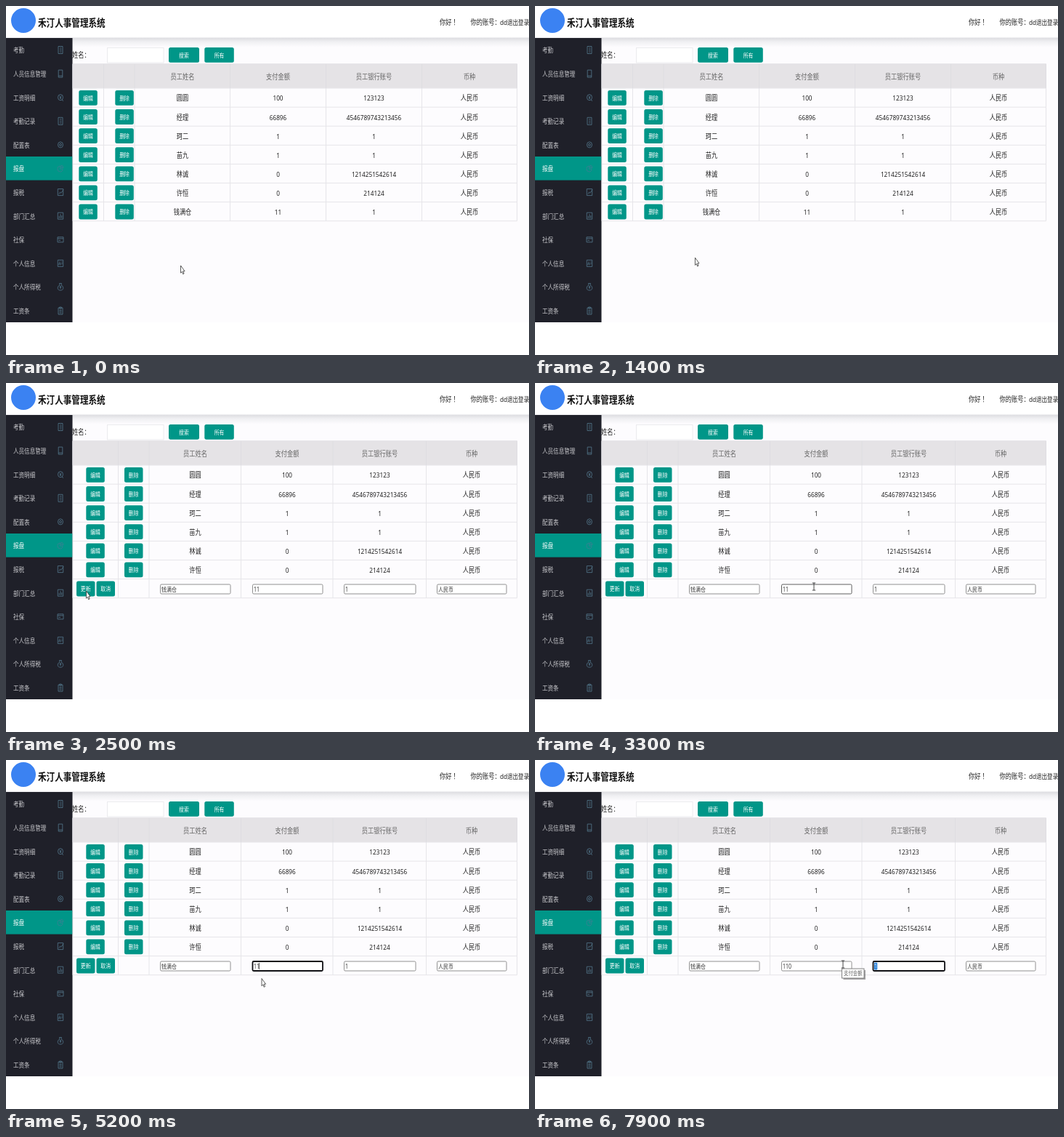
These frames come from a looping animation (720 px wide and 480 px high, 8 s). An HTML page:

```html
<!DOCTYPE html>
<html lang="zh-CN">
<head>
<meta charset="utf-8">
<title>人事管理</title>
<style>
  html, body { margin: 0; width: 100%; height: 100%; overflow: hidden; background: #fff; }
  svg { display: block; width: 720px; height: 480px; }
  text { font-family: "Noto Sans", "Noto Sans CJK SC", sans-serif; white-space: pre; }
  .icon { fill: none; stroke: #55798f; stroke-width: .8; }
</style>
</head>
<body>
<svg viewBox="0 0 720 480">
  <defs>
    <linearGradient id="shadow" x2="0" y2="1">
      <stop stop-color="#dcdce0"/>
      <stop offset=".45" stop-color="#f0f0f3"/>
      <stop offset="1" stop-color="#fdfcfe"/>
    </linearGradient>
  </defs>
  <g id="page"></g>
  <g id="live"></g>
</svg>
<script>
const LOOP = 8000, STEP = 100;
const TEAL = '#009688', SQUEEZE = 0.84; // the whole screen is shown narrower than it was laid out

// Times of the hard changes
const EDIT = 2500, FOCUS_PAY = 3900, TYPE_ZERO = 5700, FOCUS_BANK = 6800, SELECT = 6900, TIP = 7600;

const menu = ['考勤', '人员信息管理', '工资明细', '考勤记录', '配置表', '报盘',
              '报税', '部门汇总', '社保', '个人信息', '个人所得税', '工资条'];
const heads = ['员工姓名', '支付金额', '员工银行账号', '币种'];
const staff = [
  ['圆圆', '100', '123123'],
  ['经理', '66896', '4546789743213456'],
  ['珂二', '1', '1'],
  ['苗九', '1', '1'],
  ['林诚', '0', '1214251542614'],
  ['许恒', '0', '214124'],
  ['钱满仓', '11', '1']
];
const layouts = {
  view: { lines: [92, 134.5, 177, 308.5, 440.5, 572.5, 703.5], centers: [243, 374.5, 506.5, 638], edit: 100.3, del: 150.3 },
  edit: { lines: [92, 154.5, 197, 323.5, 450, 578.5, 703.5], centers: [260.5, 387, 514.5, 641], edit: 110.3, del: 163 }
};
const fields = [[212, 97], [339, 97], [465, 99], [593, 96]];
const rowY = i => 113 + 26.1 * i;

// Pointer stops: time, x, y
const pointerPath = [
  [0, 240.5, 357], [1200, 240.5, 357], [2000, 112, 288], [2200, 110.5, 286], [2700, 110.5, 286],
  [3300, 384, 280], [3900, 384, 280], [4400, 353, 299], [4700, 353, 299], [5000, 352, 300.5],
  [5700, 352, 300.5], [6400, 474, 284], [6700, 477, 284], [6800, 477, 284], [7200, 424, 281], [LOOP, 424, 281]
];

const rect = (x, y, w, h, fill, more = '') =>
  `<rect x="${x}" y="${y}" width="${w}" height="${h}" fill="${fill}" ${more}/>`;
const path = (d, more) => `<path d="${d}" ${more}/>`;
const text = (str, x, y, size, fill = '#222', anchor = 'start', weight = 400) =>
  `<text transform="translate(${x} ${y + size * .37}) scale(${SQUEEZE} 1)" font-size="${size}"
    fill="${fill}" text-anchor="${anchor}" font-weight="${weight}">${str}</text>`;
const button = (label, x, y, w = 25.5) =>
  rect(x, y, w, 20.8, TEAL, 'rx="2.5"') + text(label, x + w / 2, y + 10.6, 8.2, '#fff', 'middle', 500);

const sheet = 'M-3-5H3V5H-3ZM-1-2.5H1.5M-1 0H1.5M-1 2.5H1.5';
const ring = 'M-3.5 0a3.5 4 0 1 0 7 0a3.5 4 0 1 0-7 0';
const frame = 'M-3.7-4.5H3.7V4.5H-3.7Z';
const yen = 'M-1.3-2L0 0L1.3-2M0 0V2.3M-1.2.8H1.2';
const icons = [
  sheet, 'M-2.8-5H2.8V5H-2.8ZM-2.8 3H2.8', ring + yen + 'M2 3.2L4 5', sheet,
  ring + 'M-1.4 0a1.4 1.6 0 1 0 2.8 0a1.4 1.6 0 1 0-2.8 0', 'M-.5-3.5A3.5 4 0 1 0 3 .7H-.5ZM1-4.5A3.5 4 0 0 1 4-1H1Z',
  frame + 'M-2 2.5L-.5 0L.8 1.2L4-3.5', frame + 'M-1.8 3V.5M0 3V-2.5M1.8 3V-.5',
  'M-4-3.5H4V3.5H-4ZM-4-1.5H4M-2.5 1H0', frame + 'M-2 2.5V0H0V2.5M-1-2.5V-1M1.3-1.8H2.8M1.3.5H2.8',
  'M-1.5-5H1.5L1-3C5 0 4.5 4.5 0 4.5S-5 0-1-3Z' + yen, 'M-3-4H3V5H-3ZM-1.3-5H1.3V-3H-1.3ZM-1.5-.8H1.5M-1.5 1H1.5M-1.5 3H1.5'
];

function drawPage() {
  let out = rect(0, 0, 720, 435, '#fdfcfe') + rect(0, 0, 720, 44, '#fff') +
    rect(0, 43.5, 720, 13, 'url(#shadow)') +
    '<circle cx="24" cy="20" r="17" fill="#3b82f2"/>' +
    text('禾汀人事管理系统', 44, 22.5, 13.8, '#111', 'start', 700) +
    text('你好 ！', 597, 22.5, 9.8) + text('你的账号：', 639.5, 22.5, 9.8) +
    text('dd', 680, 22.5, 9.8) + text('退出登录', 690, 22.5, 9);
  out += rect(0, 44, 91.5, 391, '#1f2029') + rect(0, 207, 91.5, 32.6, TEAL);
  menu.forEach((label, i) => {
    const y = 61 + 32.6 * i, active = i === 5;
    out += text(label, 10, y, 9, active ? '#fff' : '#c9c9cd') +
      path(icons[i], `class="icon" transform="translate(75 ${y - .5})" ${active ? 'style="stroke:#3d7f93"' : ''}`);
  });
  out += text('姓名：', 91, 67.5, 9.8) +
    rect(139.5, 57.5, 77.5, 20.5, '#fff', 'stroke="#ebebee"') +
    button('搜索', 224, 56.9, 42) + button('所有', 273.3, 57, 40.5);
  return out;
}

function drawField(i, value, state) {
  const [x, w] = fields[i];
  const look = {
    plain: 'stroke="#858585" stroke-width=".9"',
    hover: 'stroke="#4c4c4c" stroke-width=".9"',
    focus: 'stroke="#101014" stroke-width="1.8"'
  }[state];
  return rect(x + .5, 277, w - .5, 13, '#fff', 'rx="1.5" ' + look) + text(value, x + 2, 283.6, 8.3, '#333');
}

function drawTable(t, [px, py]) {
  const editing = t >= EDIT;
  const { lines, centers, edit, del } = editing ? layouts.edit : layouts.view;
  const bottom = rowY(staff.length);
  let out = rect(92, 79.5, 611.5, 33.5, '#e5e3e6');
  out += path(lines.map(x => `M${x} 79.5V${bottom}`).join('') +
    [79.5, ...Array.from({ length: 8 }, (_, i) => rowY(i))].map(y => `M92 ${y}H703.5`).join(''),
    'stroke="#e6e5e9" stroke-width="1" fill="none"');
  out += path(lines.map(x => `M${x} 80V113`).join(''), 'stroke="#dcdbdf" stroke-width=".8"');
  heads.forEach((label, i) => out += text(label, centers[i], 97, 9.8, '#666', 'middle'));

  staff.forEach((person, r) => {
    const y = rowY(r), cells = [...person, '人民币'];
    if (editing && r === staff.length - 1) {
      out += button('更新', 97, y + 3) + button('取消', 124.5, y + 3);
      if (t >= TYPE_ZERO) cells[1] = '110';
      const focused = t >= FOCUS_BANK ? 2 : t >= FOCUS_PAY ? 1 : -1;
      cells.forEach((value, i) => out += drawField(i, value,
        i === focused ? 'focus' : t < FOCUS_BANK && overField(i, px, py) ? 'hover' : 'plain'));
    } else {
      out += button('编辑', edit, y + 3) + button('删除', del, y + 3);
      cells.forEach((value, i) => out += text(value, centers[i], y + 13.8, 9.8, '#222', 'middle'));
    }
  });

  if (t >= FOCUS_PAY && t < TYPE_ZERO) out += rect(348, 279, .8, 9, '#333');
  if (t >= SELECT) out += rect(467, 278.8, 4.2, 9.6, '#1a78d6') + text('1', 467, 283.6, 8.3, '#fff');
  if (t >= TIP) out += rect(424.5, 289, 30.5, 13, '#000', 'opacity=".35"') +
    rect(422.5, 287, 30.5, 13, '#fff', 'stroke="#777" stroke-width=".9"') +
    text('支付金额', 437.8, 293.6, 7.6, '#666', 'middle');
  return out;
}

const overField = (i, x, y) =>
  x >= fields[i][0] && x <= fields[i][0] + fields[i][1] && y > 276 && y < 291;

function pointerAt(t) {
  const n = pointerPath.findIndex(stop => stop[0] > t);
  const [t0, x0, y0] = pointerPath[n - 1], [t1, x1, y1] = pointerPath[n];
  const p = (t - t0) / (t1 - t0), e = p * p * (3 - 2 * p);
  return [x0 + (x1 - x0) * e, y0 + (y1 - y0) * e];
}

function drawPointer(t, [x, y]) {
  const beam = t >= FOCUS_BANK || (t >= EDIT && fields.some((_, i) => overField(i, x, y)));
  const place = `transform="translate(${x} ${y})"`;
  return beam
    ? path('M-2.2-5H2.2M0-5V5M-2.2 5H2.2', `${place} stroke="#333" stroke-width=".9"`)
    : path('M0 0V10.2L1.9 8.3L3.2 11.8L4.6 11L3.3 7.7H5.6Z', `${place} fill="#fff" stroke="#333" stroke-width=".8"`);
}

const live = document.getElementById('live');
let shown = -1;
function tick() {
  const t = Math.floor(performance.now() % LOOP / STEP) * STEP;
  if (t !== shown) {
    const pointer = pointerAt(t);
    live.innerHTML = drawTable(t, pointer) + drawPointer(t, pointer);
    shown = t;
  }
  requestAnimationFrame(tick);
}
document.getElementById('page').innerHTML = drawPage();
tick();
</script>
</body>
</html>
```
